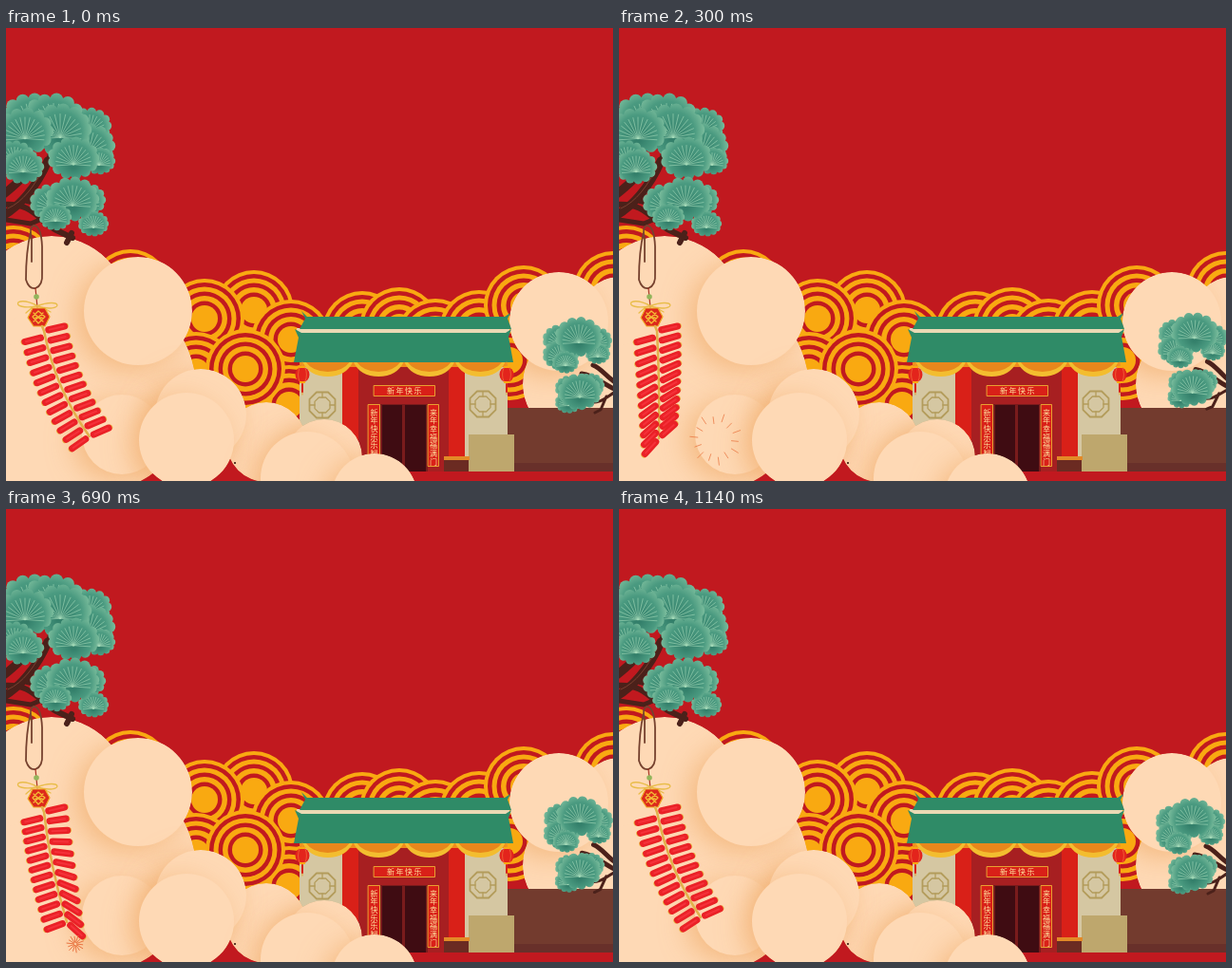
An HTML page with a canvas that plays this animation: 639x477 px, repeating every 1.17 s.

```html
<!DOCTYPE html>
<html lang="zh">
<head>
<meta charset="utf-8">
<style>
html, body { margin: 0; width: 100%; height: 100%; overflow: hidden; background: #c1191f; }
canvas { display: block; }
</style>
</head>
<body>
<canvas id="stage" width="639" height="477"></canvas>
<script>
const W = 639, H = 477, LOOP = 1170, TAU = Math.PI * 2;
const RED = '#c1191f', GOLD = '#f9a911', PEACH = '#fed9b5';
const stage = document.getElementById('stage').getContext('2d');
let g;

const disc = (x, y, r, color) => {
  g.fillStyle = color;
  g.beginPath();
  g.arc(x, y, r, 0, TAU);
  g.fill();
};
const rect = (x, y, w, h, color) => {
  g.fillStyle = color;
  g.fillRect(x, y, w, h);
};
const shape = (d, color) => {
  g.fillStyle = color;
  g.fill(new Path2D(d));
};
const line = (d, color, width) => {
  g.strokeStyle = color;
  g.lineWidth = width;
  g.lineCap = g.lineJoin = 'round';
  g.stroke(new Path2D(d));
};

function rings(x, y) {
  disc(x, y, 42, GOLD);
  [[38, RED], [33.5, GOLD], [28.5, RED], [24, GOLD], [18.5, RED], [14, GOLD]]
    .forEach(([r, color]) => disc(x, y, r, color));
}

// Circles after the first `flat` ones cast a soft shade, kept inside the cloud.
function cloud(circles, flat) {
  const outline = new Path2D();
  circles.forEach(([x, y, r]) => {
    outline.moveTo(x + r, y);
    outline.arc(x, y, r, 0, TAU);
  });
  g.save();
  g.clip(outline);
  circles.forEach(([x, y, r], i) => {
    if (i >= flat) {
      g.shadowColor = 'rgba(238,165,95,.6)';
      g.shadowBlur = 28;
      g.shadowOffsetX = -9;
      g.shadowOffsetY = 6;
    }
    disc(x, y, r, PEACH);
  });
  g.restore();
}

function pineFan(x, y, r) {
  const fill = g.createRadialGradient(x, y + r * .3, r * .1, x, y, r);
  fill.addColorStop(0, '#34806b');
  fill.addColorStop(.65, '#4a9a80');
  fill.addColorStop(1, '#7abc9c');
  g.fillStyle = fill;
  g.beginPath();
  g.ellipse(x, y, r * .88, r * .7, 0, 0, TAU);
  g.fill();
  for (let i = 0; i < 13; i++) {
    const a = i / 13 * TAU;
    disc(x + Math.cos(a) * r * .8, y + Math.sin(a) * r * .63, r * .21, fill);
  }
  g.strokeStyle = 'rgba(165,218,185,.75)';
  g.lineWidth = .8;
  g.beginPath();
  for (let i = 0; i <= 14; i++) {
    const a = Math.PI * (.93 + i / 14 * 1.14);
    g.moveTo(x, y + r * .25);
    g.lineTo(x + Math.cos(a) * r * .68, y + r * .15 + Math.sin(a) * r * .65);
  }
  g.stroke();
}

function lantern(x) {
  line(`M${x} 352V386`, '#e8a02a', 1);
  g.fillStyle = '#e3241c';
  g.beginPath();
  g.ellipse(x, 365, 7.5, 8, 0, 0, TAU);
  g.fill();
  line(`M${x - 3} 358Q${x - 6} 365 ${x - 3} 372M${x + 3} 358Q${x + 6} 365 ${x + 3} 372`, '#f0683a', .8);
  rect(x - 3, 356, 6, 2, GOLD);
  rect(x - 3, 372, 6, 2, GOLD);
  line(`M${x} 375V383`, '#d92018', 2);
}

function lattice(x, y) {
  const octagon = r => `M${x - r * .45} ${y - r}H${x + r * .45}L${x + r} ${y - r * .45}V${y + r * .45}` +
    `L${x + r * .45} ${y + r}H${x - r * .45}L${x - r} ${y + r * .45}V${y - r * .45}Z`;
  line(octagon(13.5), '#b39c5b', 1.8);
  line(octagon(8), '#b39c5b', 1.3);
  line(`M${x} ${y - 13}V${y - 8}M${x} ${y + 8}V${y + 13}M${x - 13} ${y}H${x - 8}M${x + 8} ${y}H${x + 13}`, '#b39c5b', 1.3);
}

function sign(x, y, w, h) {
  rect(x, y, w, h, '#d92018');
  g.strokeStyle = '#e9a031';
  g.lineWidth = 1;
  g.strokeRect(x + .5, y + .5, w - 1, h - 1);
}

function letters(text, x, y, dx, dy) {
  g.fillStyle = '#ffe3a0';
  g.font = '500 8px "Noto Sans CJK SC", "Noto Sans CJK", sans-serif';
  g.textAlign = 'center';
  g.textBaseline = 'middle';
  [...text].forEach((c, i) => g.fillText(c, x + dx * i, y + dy * i));
}

function house() {
  rect(528, 400, 111, 58, '#733b2e');
  rect(528, 458, 111, 9, '#68302a');
  rect(309, 350, 219, 117, '#d5c7a2');
  rect(354, 350, 129, 117, '#d92018');
  rect(371, 350, 95, 117, '#a71f21');
  lattice(333, 397);
  lattice(502, 396);

  rect(394, 396, 50, 71, '#7a1b1c');
  rect(396, 397, 21, 70, '#3f0c12');
  rect(420, 397, 22, 70, '#3f0c12');
  sign(387, 376, 65, 12);
  letters('新年快乐', 405, 382.3, 9.5, 0);
  sign(381, 396, 13, 66);
  letters('新年快乐乐翻天', 387.5, 404.5, 0, 8.7);
  sign(444, 396, 12, 66);
  letters('来年幸福福满门', 450, 404.5, 0, 8.7);

  rect(487, 428, 48, 39, '#bea76d');
  rect(461, 451, 27, 4, '#e38a27');
  rect(461, 455, 26, 12, '#6b2b22');

  rect(309, 350, 219, 7, '#f08c1d');
  for (let i = 0; i < 4; i++) {
    const x = 312 + i * 53.5;
    shape(`M${x} 351H${x + 53.5}Q${x + 46} 367 ${x + 26.75} 367Q${x + 7} 367 ${x} 351Z`, '#f3bd2f');
    shape(`M${x + 3} 351H${x + 50.5}Q${x + 42} 362 ${x + 26.75} 362Q${x + 11} 362 ${x + 3} 351Z`, '#e8871c');
  }
  rect(306, 316, 224, 6, '#ead9b4');
  shape('M311 298L317 304H525L531 300L528 306L532 317H309L315 306Z', '#2f8b67');
  shape('M304 317L311 321H526L532 317L529 325L534 352H303L308 326Z', '#2f8b67');
  lantern(312);
  lantern(527);
}

function leftTree() {
  const bark = '#4b211a';
  line('M-4 198C14 188 32 168 44 140M-4 176C10 166 16 158 25 150', bark, 9);
  line('M-4 186C28 183 34 203 53 213L70 221M22 182C40 186 50 188 62 190M64 226L69 216', bark, 6);
  line('M44 140L48 128M0 202L26 206L38 201', bark, 5);
  line('M2 190C18 183 30 166 40 147', '#7a4030', 1);
  [[88, 103, 23], [27, 96, 33], [87, 124, 28], [50, 96, 33], [57, 107, 33], [20, 109, 30],
   [9, 136, 21], [18, 146, 22], [98, 140, 17], [71, 137, 27],
   [49, 184, 24], [83, 181, 22], [92, 206, 16], [70, 180, 28], [52, 199, 17]]
    .forEach(f => pineFan(...f));
  line('M26 215C21 235 21 252 21 265Q24 275 31 274Q39 271 38 258V230Q37 208 29 208Q24 210 27 222V246', '#76422f', 1.8);
}

function knot() {
  line('M31 274L33 294', '#a93323', 1.2);
  line('M32 292C8 280 4 298 32 293C61 282 61 301 33 293M28 294L21 300M38 294L47 299', '#e9bd4b', 1.4);
  disc(32, 283, 2.8, '#92b55b');
  shape('M28 295H41L46 304L41 314H29L23 305Z', '#dd291c');
  line('M28 295H41L46 304L41 314H29L23 305Z', '#efaa26', 1.2);
  line('M28 304L34 298L41 304L34 311ZM29 300L39 309M39 300L29 309M31 305H38', '#f5bd36', 1.3);
}

function buildScene() {
  const canvas = document.createElement('canvas');
  canvas.width = W;
  canvas.height = H;
  g = canvas.getContext('2d');
  rect(0, 0, W, H, RED);
  [[8, 250], [131, 275], [261, 297], [300, 328], [209, 306], [200, 362], [298, 397], [252, 359],
   [375, 319], [414, 315], [452, 327], [498, 318], [545, 292], [530, 350], [639, 277]]
    .forEach(p => rings(...p));
  cloud([[600, 375, 56], [640, 360, 60], [645, 302, 40], [582, 309, 52]], 3);
  house();
  cloud([[48, 301, 82], [90, 380, 110], [30, 430, 100], [139, 298, 57], [122, 428, 42],
    [274, 436, 42], [205, 407, 48], [190, 434, 50],
    [335, 452, 40], [317, 474, 49], [388, 493, 45]], 3);
  rect(240, 457, 2, 2, '#5c3a2a');
  leftTree();
  knot();
  return canvas;
}

// time, string control x/y, string end x/y, left tilt, right tilt (degrees)
const SWAY = [
  [0, 52, 380, 88, 430, 35, 24],
  [180, 46, 375, 58, 434, 3, -3],
  [300, 43, 380, 42, 432, 48, 42],
  [510, 45, 380, 46, 434, 46, -28],
  [690, 46, 375, 64, 435, 20, -42],
  [810, 48, 380, 74, 435, 20, -36],
  [1140, 52, 380, 86, 430, 33, 24],
  [1170, 52, 380, 88, 430, 35, 24]
];

function firecrackers(t) {
  const k = SWAY.findIndex(row => row[0] > t);
  const from = SWAY[k - 1], to = SWAY[k];
  const u = (t - from[0]) / (to[0] - from[0]);
  const [, cx, cy, ex, ey, left, right] = from.map((v, i) => v + (to[i] - v) * u);
  const point = s => [
    40 * (1 - s) ** 2 + 2 * cx * s * (1 - s) + ex * s * s,
    319 * (1 - s) ** 2 + 2 * cy * s * (1 - s) + ey * s * s
  ];
  const cracker = (s, side, tilt) => {
    const [x, y] = point(s);
    const a = (13 + (tilt - 13) * s) * Math.PI / 180;
    const at = d => `${x + side * Math.cos(a) * d} ${y - side * Math.sin(a) * d}`;
    g.lineCap = 'butt';
    line(`M${at(5)}L${at(23.5)}`, '#e9b545', 6);
    line(`M${at(5)}L${at(22)}`, '#ea2127', 7.2);
    line(`M${at(6)}L${at(21)}`, '#f5313a', 2);
  };
  line(`M38 314L40 319Q${cx} ${cy} ${ex} ${ey}`, '#e2b04a', 2.5);
  for (let i = 0; i < 12; i++) {
    cracker(.05 + i / 11 * .95, -1, left);
    cracker(i / 11, 1, right);
  }
}

function burst(t, start, life, x, y, size) {
  const u = (t - start) / life;
  if (u <= 0 || u >= 1) return;
  const outer = size * (1 - (1 - u) ** 2), inner = outer * u;
  g.globalAlpha = Math.min(1, (1 - u) * 2.5);
  for (let i = 0; i < 14; i++) {
    const a = i / 14 * TAU + .1, reach = i % 2 ? 1 : .86;
    const at = r => `${x + Math.cos(a) * r * reach} ${y + Math.sin(a) * r * reach}`;
    line(`M${at(inner)}L${at(outer)}`, '#ea7440', 1);
  }
  g.globalAlpha = 1;
}

function rightTree(t) {
  const swing = t < 850 ? Math.sin(Math.PI * t / 850) ** 2 : 0;
  g.save();
  g.translate(690, 380);
  g.rotate(.067 * swing);
  g.translate(-690, -380);
  line('M650 376C636 374 630 360 618 355M650 384C634 380 622 366 606 364', '#4b211a', 5);
  line('M650 378C634 386 628 396 614 394M632 388L626 402L620 405', '#4b211a', 3);
  [[584, 328, 19], [621, 329, 17], [584, 344, 19], [623, 343, 13], [603, 325, 25], [589, 352, 14],
   [594, 379, 16], [615, 376, 15], [592, 394, 14], [604, 383, 23]]
    .forEach(f => pineFan(...f));
  g.restore();
}

const scene = buildScene();
g = stage;

function frame(now) {
  const t = now % LOOP;
  g.drawImage(scene, 0, 0);
  firecrackers(t);
  burst(t, 90, 300, 102, 433, 30);
  burst(t, 375, 300, 73, 455, 30);
  burst(t, 590, 480, 73, 458, 24);
  rightTree(t);
  requestAnimationFrame(frame);
}
requestAnimationFrame(frame);
</script>
</body>
</html>
```
